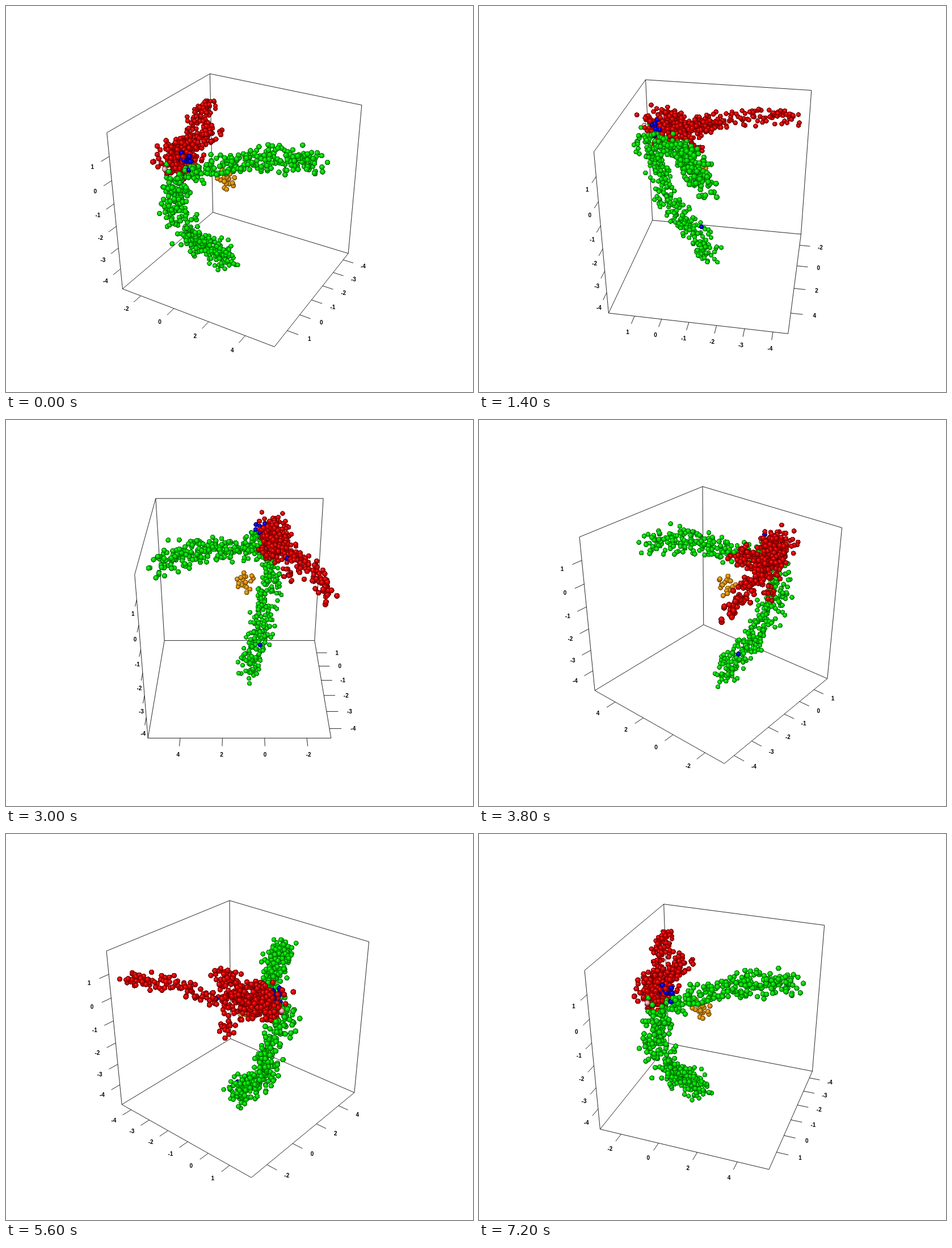
These frames come from a looping animation (823x680 px, 7.4 s). An HTML page with a canvas:

```html
<!DOCTYPE html>
<html lang="en">
<head>
<meta charset="utf-8">
<title>Rotating 3D scatter plot</title>
<style>
  html, body { margin: 0; width: 100%; height: 100%; overflow: hidden; background: #fff; }
  canvas { display: block; }
</style>
</head>
<body>
<canvas id="stage" width="823" height="680"></canvas>
<script>
const ctx = document.getElementById('stage').getContext('2d');
const FOCAL = 1275, DISTANCE = 4.134, TILT = Math.PI / 6, RADIUS = 0.0142;
const STEP_MS = 200, LOOP_MS = 7400, LAST_STEP = 35;
const TICK = 1 / 15;

const AXES = {
  x: { mid: 1.19, span: 8.68, from: -2, to: 4, by: 2 },
  y: { mid: -1.28, span: 6.5, from: -4, to: 1, by: 1 },
  h: { mid: -1.52, span: 6.94, from: -4, to: 1, by: 1 }
};

let seed = 20;
const random = () => (seed = (seed * 16807) % 2147483647) / 2147483647;

// Scatter balls around a polyline in the unit cube.
const points = [];
function cloud(color, count, spread, ...path) {
  for (let i = 0; i < count; i++) {
    const along = (i + random()) / count * (path.length - 1);
    const k = Math.floor(along);
    const a = path[k], b = path[k + 1] ?? a;
    const pos = a.map((v, j) =>
      v + (b[j] - v) * (along - k) + (random() + random() - 1) * spread);
    points.push({ color, pos });
  }
}

const redCore = [-0.18, 0.37, 0.36], redBend = [-0.24, 0.18, 0.32];
cloud('red', 250, 0.11, redCore, redBend);
cloud('red', 110, 0.06, redBend, [-0.37, -0.13, 0.36], [-0.45, -0.43, 0.35]);
cloud('red', 60, 0.07, [-0.155, 0.02, 0.41], [-0.19, 0.14, 0.37]);
cloud('red', 14, 0.05, [-0.28, 0.15, 0.17]);

const greenTop = [-0.13, 0.43, 0.29], armStart = [-0.02, 0.2, 0.3];
cloud('green', 50, 0.07, greenTop, armStart);
cloud('green', 185, 0.09, armStart, [0.22, 0.09, 0.36], [0.45, -0.05, 0.33]);
cloud('green', 290, 0.09, greenTop, [-0.2, 0.35, 0.06],
  [-0.15, 0.29, -0.15], [-0.11, 0.14, -0.29], [-0.04, 0.03, -0.43]);

cloud('orange', 18, 0.055, [-0.03, 0.09, 0.16]);
cloud('blue', 8, 0.06, [-0.13, 0.35, 0.37]);
cloud('blue', 1, 0, [-0.268, 0.066, 0.313]);
cloud('blue', 1, 0, [-0.124, 0.09, -0.274]);
cloud('pink', 1, 0, [-0.193, 0.436, 0.34]);

function ball(hue, saturation, light) {
  const sprite = document.createElement('canvas');
  sprite.width = sprite.height = 40;
  const c = sprite.getContext('2d');
  const g = c.createRadialGradient(16, 15, 0, 20, 20, 20);
  const shade = (at, l) => g.addColorStop(at, `hsl(${hue}, ${saturation}%, ${l}%)`);
  shade(0, light + 30);
  shade(0.25, light);
  shade(0.65, light * 0.85);
  shade(1, light * 0.3);
  c.fillStyle = g;
  c.arc(20, 20, 20, 0, 7);
  c.fill();
  return sprite;
}
const balls = {
  red: ball(0, 100, 46),
  green: ball(120, 100, 46),
  orange: ball(38, 90, 49),
  blue: ball(240, 100, 46),
  pink: ball(350, 60, 84)
};

function project([x, y, h], degrees) {
  const a = degrees * Math.PI / 180;
  const side = x * Math.cos(a) - y * Math.sin(a);
  const near = x * Math.sin(a) + y * Math.cos(a);
  const up = h * Math.cos(TILT) - near * Math.sin(TILT);
  const depth = DISTANCE - h * Math.sin(TILT) - near * Math.cos(TILT);
  const scale = FOCAL / depth;
  return { x: 411.5 + side * scale, y: 340 - up * scale, depth, scale };
}

// The box repeats every quarter turn; only the axes change places.
function drawBox(turn) {
  const angle = turn % 90, quarter = Math.floor(turn / 90) % 4;
  const line = (...path) => {
    ctx.beginPath();
    path.forEach(p => {
      const s = project(p, angle);
      ctx.lineTo(s.x, s.y);
    });
    ctx.stroke();
  };
  const axis = (name, sign, place, out) => {
    const { mid, span, from, to, by } = AXES[name];
    for (let value = from; value <= to; value += by) {
      const start = place(sign * (value - mid) / span);
      const offset = d => start.map((v, i) => v + out[i] * d);
      line(start, offset(TICK));
      const label = project(offset(2 * TICK), angle);
      ctx.fillText(value, label.x - 0.5, label.y + 1);
    }
  };
  const left = h => [-0.5, 0.5, h], back = h => [-0.5, -0.5, h], right = h => [0.5, -0.5, h];
  const front = [0.5, 0.5, -0.5];

  line(left(-0.5), left(0.5), back(0.5), right(0.5), right(-0.5), front,
    left(-0.5), back(-0.5), right(-0.5));
  line(back(-0.5), back(0.5));

  const toLeft = [0, 1, 0], toRight = [1, 0, 0];
  const even = quarter % 2 === 0;
  axis(even ? 'x' : 'y', quarter % 3 ? -1 : 1, v => [v, 0.5, -0.5], toLeft);
  axis(even ? 'y' : 'x', quarter < 2 ? 1 : -1, v => [0.5, v, -0.5], toRight);
  if (angle < 45) axis('h', 1, left, toLeft);
  else axis('h', 1, right, toRight);
}

function draw(turn) {
  ctx.fillStyle = '#fff';
  ctx.fillRect(0, 0, 823, 680);
  ctx.fillStyle = ctx.strokeStyle = '#000';
  ctx.lineWidth = 0.85;
  ctx.font = 'bold 10px "Liberation Sans", Arial, sans-serif';
  ctx.textAlign = 'center';
  ctx.textBaseline = 'middle';
  drawBox(turn);
  points
    .map(p => ({ color: p.color, ...project(p.pos, turn) }))
    .sort((a, b) => b.depth - a.depth)
    .forEach(p => {
      const r = RADIUS * p.scale;
      ctx.drawImage(balls[p.color], p.x - r, p.y - r, 2 * r, 2 * r);
    });
}

const begin = performance.now();
function frame() {
  const step = Math.floor((performance.now() - begin) % LOOP_MS / STEP_MS);
  draw(30 + 10 * Math.min(step, LAST_STEP));
  requestAnimationFrame(frame);
}
frame();
</script>
</body>
</html>
```
